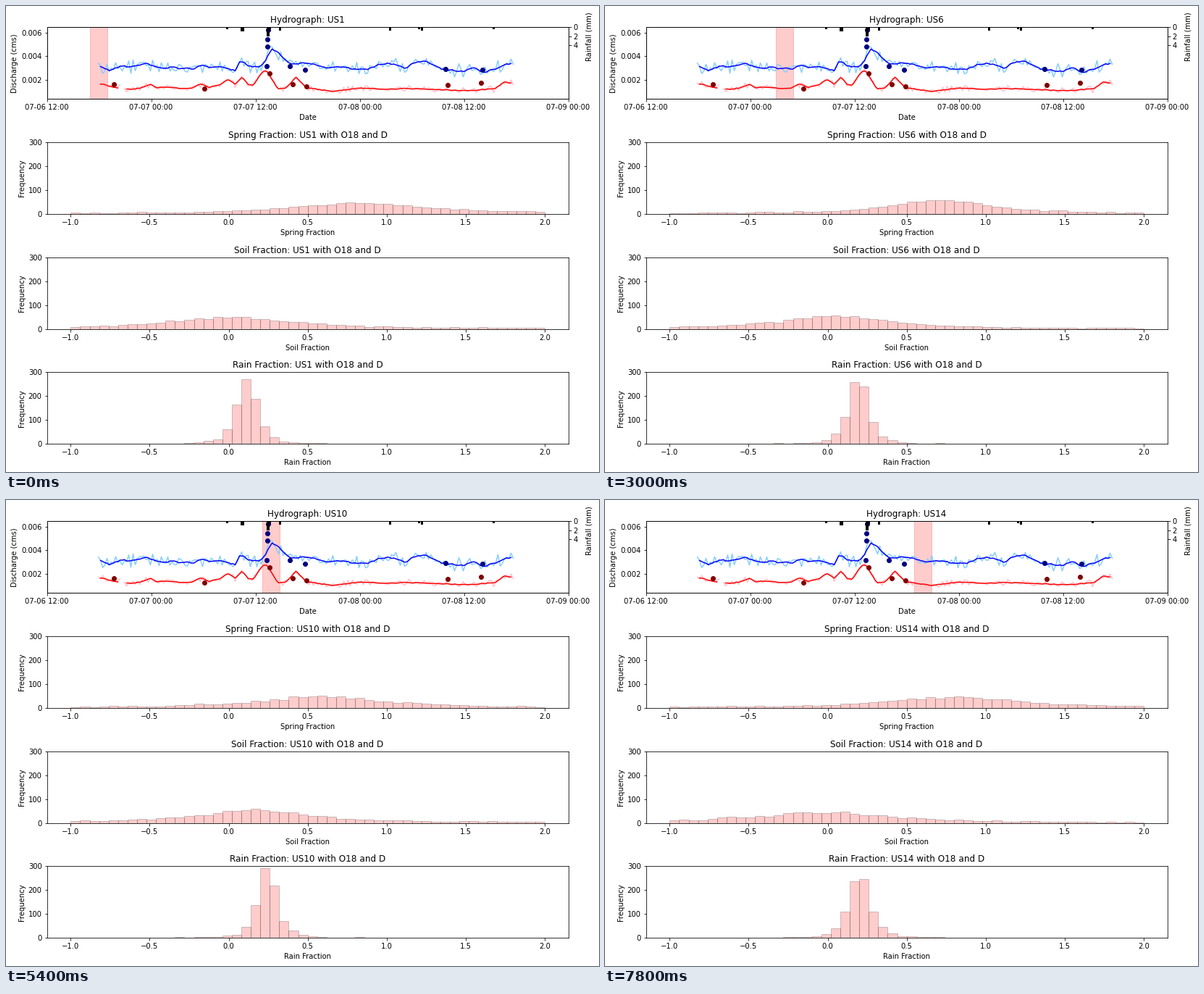
Write a matplotlib script that moves like this. It is 819 px wide and 643 px high and loops after 8000 ms.

```python
import numpy as np
import matplotlib.pyplot as plt
from matplotlib.animation import FuncAnimation

W, H, DPI = 819, 643, 72
LEFT, TOP, AX_W, AX_H, PITCH = 56.6, 29.2, 720, 99.1, 158.7
BINS = 50
EDGES = np.linspace(-1, 2, BINS + 1)
MIDS = EDGES[:-1] + 1.5 / BINS

plt.rcParams.update({"font.family": "DejaVu Sans", "font.size": 10})


def hour(px):
    """Stage x to hours after the left end of the date axis."""
    return (np.asarray(px, float) + 0.5 - LEFT) / 12


def flow(py):
    """Stage y to discharge."""
    return 0.002 + (101.5 - np.asarray(py, float)) / 16100


# Turning points of the two flow curves, on the stage
BLUE = [(127, 82), (142, 90), (160, 82), (178, 84), (192, 80), (214, 88),
        (230, 84), (256, 88), (270, 82), (284, 85), (300, 83), (317, 88),
        (321, 77), (327, 76), (332, 82), (353, 84), (358, 77), (366, 61),
        (376, 65), (392, 83), (403, 82), (408, 78), (425, 78), (440, 84),
        (466, 83), (478, 87), (496, 84), (515, 77), (538, 82), (551, 86),
        (562, 78), (580, 76), (600, 87), (633, 90), (644, 82), (660, 90),
        (676, 86), (692, 80), (700, 79)]
RED = [(127, 108), (135, 108), (142, 111), (153, 113), (166, 114), (184, 113),
       (199, 108), (208, 113), (255, 114), (269, 108), (280, 113), (296, 109),
       (306, 101), (316, 108), (326, 98), (334, 109), (341, 110), (354, 91),
       (360, 90), (375, 114), (386, 113), (400, 97), (415, 112), (450, 117),
       (487, 114), (580, 114), (640, 117), (675, 115), (687, 105), (700, 107)]

BLUE_DOTS = [(361, 33), (360, 46), (360, 56), (359, 83), (391, 83), (412, 88),
             (606, 87), (657, 88)]
RED_DOTS = [(148, 108), (273, 114), (363, 93), (395, 108), (414, 111),
            (609, 109), (655, 106)]

# Rain bars: centre, width, depth in mm
RAIN_BARS = [(305, 3, 0.4), (326, 5, 0.9), (361.5, 4, 2), (364, 3, 0.5),
             (378, 3, 0.8), (530, 3, 0.8), (570, 3, 0.4), (574, 3, 0.8),
             (673, 3, 0.4)]

# Centre and half width of each distribution at a few of the samples
KEYS = [0, 2, 5, 7, 9, 11, 13]
SPRING = {"mid": [0.82, 0.72, 0.72, 0.60, 0.60, 1.10, 0.82],
          "wide": [0.48, 0.46, 0.37, 0.40, 0.46, 0.68, 0.50]}
SOIL = {"mid": [0.03, 0.16, 0.05, 0.12, 0.15, -0.25, -0.03],
        "wide": [0.43, 0.42, 0.37, 0.36, 0.42, 0.55, 0.48]}
RAIN = {"mid": [0.115, 0.10, 0.195, 0.265, 0.245, 0.175, 0.20],
        "wide": [0.11, 0.104, 0.098, 0.091, 0.099, 0.148, 0.109]}

# Name, parameters, mass and tail exponent
PANELS = [("Spring", SPRING, 22, 1), ("Soil", SOIL, 22, 1),
          ("Rain", RAIN, 30, 1.8)]


def heights(panel, k):
    """Bell with heavy tails and a little sampling noise."""
    _, params, mass, power = PANELS[panel]
    rng = np.random.default_rng(100 * panel + k)
    mid = np.interp(k, KEYS, params["mid"])
    wide = np.interp(k, KEYS, params["wide"])
    h = mass / wide * (1 + ((MIDS - mid) / wide) ** 2) ** -power
    h += rng.normal(0, 0.45, BINS) * np.sqrt(h) + rng.uniform(0, 2, BINS)
    return np.maximum(np.round(h), 0)


def span_x(k):
    """Samples come every two hours, then closer together in the storm."""
    return np.interp(k, [0, 8, 9, 11, 13], [127, 319, 365, 386, 438])


fig = plt.figure(figsize=(W / DPI, H / DPI), dpi=DPI, facecolor="white")


def add_axes(row):
    base = H - TOP - AX_H - PITCH * row
    return fig.add_axes([LEFT / W, base / H, AX_W / W, AX_H / H])


def draw_flow(points, sd, light, dark, seed, gap=False):
    """Noisy series with its smoothed version on top."""
    x = np.arange(127, 701, 3)
    trend = np.interp(x, *np.transpose(points))
    noise = np.random.default_rng(seed).normal(0, sd, x.size).clip(-2 * sd, 2 * sd)
    smooth = np.convolve(noise, np.ones(9) / 9, "same")
    raw, mean = trend + noise, trend + smooth
    mean[[0, -1]] = np.nan
    if gap:
        raw[(x > 157) & (x < 163)] = np.nan
        mean[(x > 154) & (x < 166)] = np.nan
    top.plot(hour(x), flow(raw), color=light, lw=1.5)
    top.plot(hour(x), flow(mean), color=dark, lw=1.5)


top = add_axes(0)
span = top.axvspan(0, 2, color="r", alpha=0.2)
draw_flow(BLUE, 4.8, "lightskyblue", "b", seed=4)
draw_flow(RED, 2.2, "pink", "r", seed=9, gap=True)
for dots, color in ((BLUE_DOTS, "navy"), (RED_DOTS, "maroon")):
    dx, dy = np.transpose(dots)
    top.plot(hour(dx), flow(dy), "o", color=color, ms=6)

top.set_xlim(0, 60)
top.set_ylim(flow(TOP + AX_H), flow(TOP))
top.set_yticks([0.002, 0.004, 0.006])
top.set_xticks(range(0, 61, 12),
               [f"07-{6 + h // 24:02d} {h % 24:02d}:00"
                for h in range(12, 73, 12)])
top.set_xlabel("Date")
top.set_ylabel("Discharge (cms)")
top_title = top.set_title("")

rain_ax = top.twinx()
bx, bw, bh = np.transpose(RAIN_BARS)
rain_ax.bar(hour(bx), bh, width=bw / 12, color="k")
rain_ax.set_xlim(0, 60)
rain_ax.set_ylim(16, 0)
rain_ax.set_yticks([0, 2, 4])
rain_ax.set_ylabel("Rainfall (mm)", y=0.87, labelpad=10.5)

hists, titles = [], []
for n, (name, *_) in enumerate(PANELS):
    ax = add_axes(n + 1)
    hists.append(ax.bar(EDGES[:-1], np.zeros(BINS), width=3 / BINS,
                        align="edge", facecolor="r", edgecolor="k",
                        linewidth=1, alpha=0.2))
    ax.set_xlim(-1.15, 2.15)
    ax.set_ylim(0, 300)
    ax.set_xticks(np.arange(-1, 2.1, 0.5))
    ax.set_yticks(range(0, 301, 100))
    ax.set_xlabel(f"{name} Fraction")
    ax.set_ylabel("Frequency")
    titles.append(ax.set_title(""))


def update(i):
    k = i // 3  # each sample holds for 600 ms
    label = f"US{k + 1}"
    span.set_x(hour(span_x(k)) - 1)
    top_title.set_text(f"Hydrograph: {label}")
    for n, (name, *_) in enumerate(PANELS):
        titles[n].set_text(f"{name} Fraction: {label} with O18 and D")
        for bar, h in zip(hists[n], heights(n, k)):
            bar.set_height(h)
    return []


anim = FuncAnimation(fig, update, frames=40, interval=200, repeat=True,
                     repeat_delay=0, blit=False)
plt.show()
```
